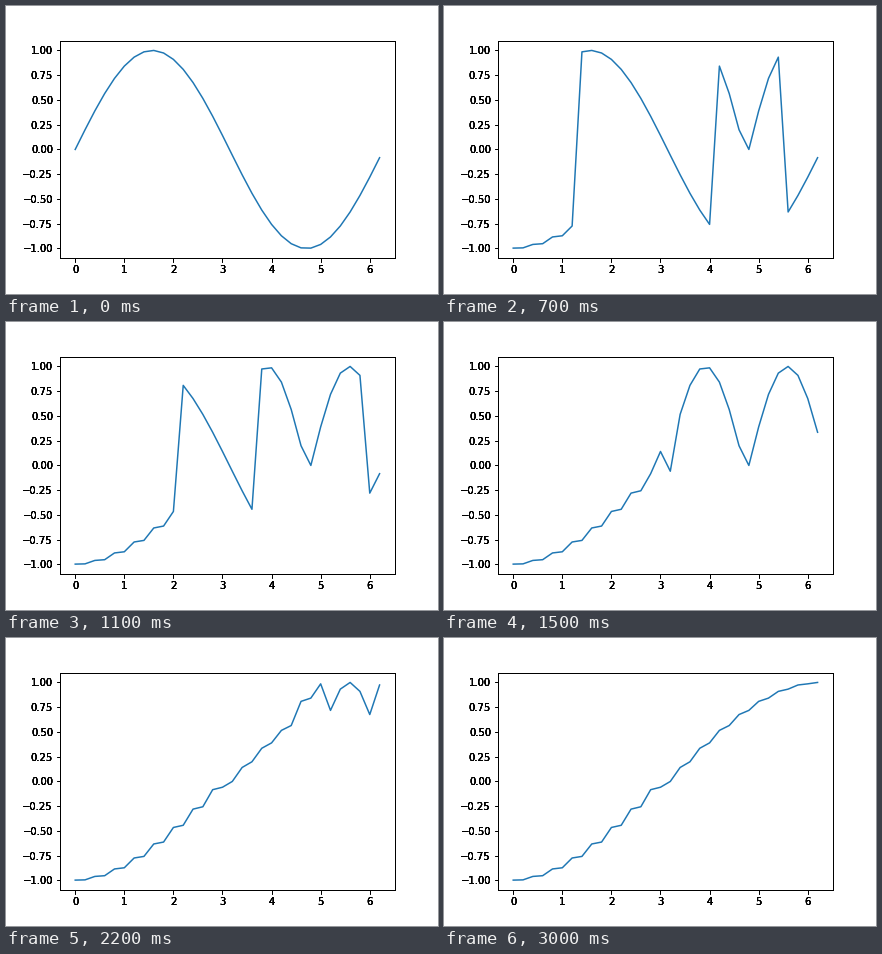
Write a matplotlib script that moves like this. It is 432x288 px and loops after 3300 ms.

```python
import matplotlib.pyplot as plt
import numpy as np
from matplotlib.animation import FuncAnimation

STEP_MS = 100
OVERDRAW = 5  # repeated passes give the heavy, hard-edged labels and frame


def selection_sort(values):
    """Yield the array before sorting and after each swap."""
    a = values.copy()
    yield a.copy()
    for i in range(len(a)):
        j = i + np.argmin(a[i:])
        a[[i, j]] = a[[j, i]]
        yield a.copy()


x = np.arange(0, 2 * np.pi, 0.2)
states = list(selection_sort(np.sin(x)))

plt.rcParams["font.family"] = "DejaVu Sans"
fig = plt.figure(figsize=(6, 4), dpi=72, facecolor="white")
fig.subplots_adjust(left=0.125, right=0.9, bottom=0.125, top=0.88)
ax = fig.add_subplot()
line, = ax.plot(x, states[0], color="#1f77b4", lw=1.5)

for _ in range(OVERDRAW - 1):
    layer = fig.add_subplot(sharex=ax, sharey=ax)
    layer.patch.set_visible(False)


def update(step):
    line.set_ydata(states[step])
    return line,


anim = FuncAnimation(fig, update, frames=len(states), interval=STEP_MS,
                     repeat=True, repeat_delay=0)
plt.show()
```
